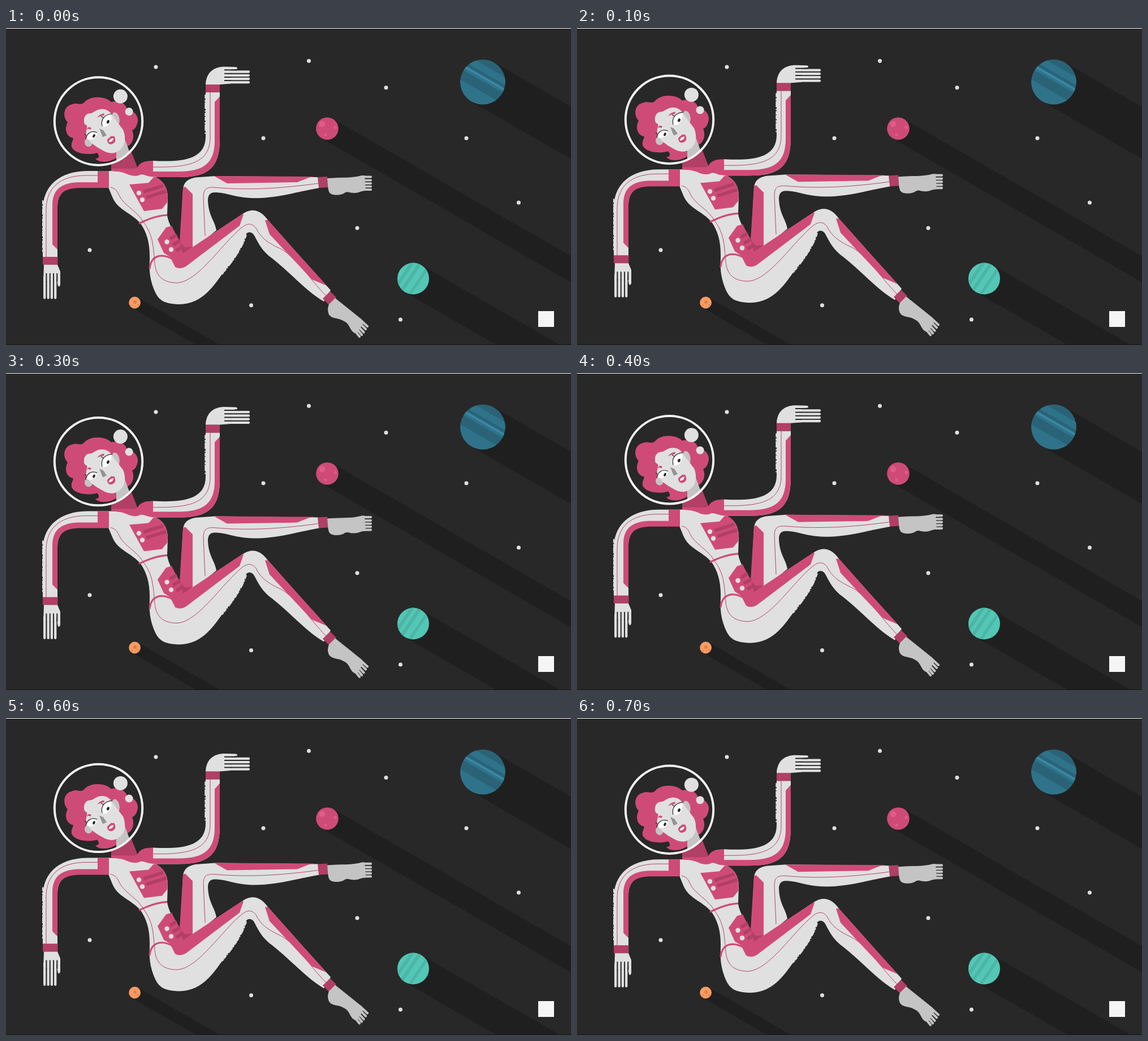
Recreate the animation shown at these times as an HTML page. Size 999x561 px, loop 800 ms.

```html
<!DOCTYPE html>
<html lang="en">
<head>
<meta charset="utf-8">
<title>Adrift</title>
<style>
  html, body { margin: 0; width: 100%; height: 100%; overflow: hidden; background: #282828; }
  svg { display: block; width: 999px; height: 561px; }
  .light { fill: #e0e0e0; }
  .skin { fill: #c4c4c4; }
  .pink { fill: #cf4b77; }
  .deep { fill: #b13f66; }
  .shade { fill: #1f1f1f; }
  .seam { fill: none; stroke: #b2436a; stroke-width: 1; }
  .trim { fill: none; stroke: #cf4b77; stroke-width: 3.2; }
  .bar { fill: none; stroke: #b13f66; stroke-width: 6; }
  .digits { fill: none; stroke: #e0e0e0; stroke-width: 4.3; stroke-linecap: round; }
  .gaps { fill: none; stroke: #282828; stroke-width: 2; }
  .toes { fill: none; stroke: #c4c4c4; stroke-width: 4.2; stroke-linecap: round; }
  .rough { fill: none; stroke: #e0e0e0; stroke-width: 2; stroke-dasharray: 7 2 4 1 11 3 2 2 6 1; }
</style>
</head>
<body>
<svg viewBox="0 0 999 561">
  <defs>
    <clipPath id="blue"><circle r="39.8"/></clipPath>
    <clipPath id="teal"><circle r="28"/></clipPath>
    <clipPath id="glass"><circle cx="163.5" cy="165" r="77"/></clipPath>
  </defs>
  <rect width="999" height="561" fill="#282828"/>
  <g id="shadows" class="shade"></g>
  <g id="stars" class="light"></g>

  <g transform="translate(843 95.5)">
    <g clip-path="url(#blue)"><g transform="rotate(30)">
      <rect x="-40" y="-40" width="80" height="80" fill="#2a6377"/>
      <path fill="#2f738a" d="M-40-27H40V-15H-40ZM-40-10H40V-1H-40ZM-40 16H40V40H-40Z"/>
      <path fill="#3988a5" d="M-40-9H40V-5.500H-40Z"/>
    </g></g>
  </g>
  <g transform="translate(568 178)">
    <circle r="19.8" class="pink"/>
    <g fill="#e15b88"><circle cx="-9" cy="-8" r="5.5"/><circle cx="14" cy="-2" r="2.7"/><circle cx="-3" cy="11" r="2.5"/></g>
  </g>
  <g transform="translate(720 443.5)">
    <g clip-path="url(#teal)"><g transform="rotate(-56)">
      <rect x="-30" y="-30" width="60" height="60" fill="#54c6b5"/>
      <path fill="#4cb5a6" d="M-30-20H30V-14H-30ZM-30-8H30V-2H-30ZM-30 8H30V13H-30Z"/>
    </g></g>
  </g>
  <g transform="translate(227.6 486)">
    <circle r="10.4" fill="#fa9c62"/>
    <g fill="#df7f4c"><circle cx=".5" cy="-1" r="3"/><circle cx="6" cy="4" r="1.5"/><circle cx="-5" cy="5" r="1.2"/><circle cx="1" cy="6" r="1"/></g>
  </g>
  <rect x="941" y="501" width="28" height="28" fill="#f5f5f5"/>

  <g id="diver">
    <!-- far leg -->
    <path class="light" d="M307 393L313 286C314 271 324 265 342 264L370 262L552 264L554 283C500 293 480 301 437 301C403 300 391 291 369 291C360 291 357 297 357 305C358 333 369 340 372 358L330 392Z"/>
    <path class="pink" d="M306 393L313 282L317 281L330 294V388L318 398Z"/>
    <path class="pink" d="M368 262L545 263L535 265L515 273L391 275Z"/>
    <path class="seam" d="M352 368L349 300C349 285 354 282 367 282C410 286 465 287 552 275"/>
    <path class="deep" d="M551 264L568 263L569 282L553 283Z"/>
    <path class="skin" d="M568 266C592 264 613 266 629 261H634L636 288C627 288 625 292 615 292C607 292 605 289 600 291C593 296 586 296 579 295C570 294 570 286 569 280Z"/>
    <path class="toes" d="M630 263.5L645 263.5M631 269.5H645M631 275H645M631 280.5H645M631 286H645"/>

    <!-- torso and near leg -->
    <path class="light" d="M181 253H210L262 263C276 268 286 281 286 300L285 331C287 349 302 369 313 389L328 389L417 330C436 316 452 324 463 340L519 403L574 464L562 484C531 466 503 433 471 408C453 395 447 382 440 369C436 360 428 360 425 364C418 389 404 409 387 429C370 451 350 489 306 489C277 488 269 481 261 461C255 445 253 432 254 411C255 381 249 362 238 346C222 327 197 322 188 299L181 282Z"/>
    <path class="rough" d="M425 366C417 391 403 410 382 436"/>
    <path class="pink" d="M218 277L252 274L262 263C276 268 286 281 286 300L285 309L276 320L244 324Z"/>
    <path class="bar" d="M243 290L278 279M248 300L283 289"/>
    <path class="trim" d="M235 346L246 341Q267 332 285 331"/>
    <path class="pink" d="M268 374L283 353L293 350C300 366 310 381 315 389H328L418 329L420 330L413 350L318 422Q308 428 299 423L290 405L279 398Z"/>
    <path class="deep" d="M308 380L316 388L330 387L313 399Z"/>
    <path class="bar" d="M290 373L302 366M295 384L308 376M301 394L314 386"/>
    <g class="light"><circle cx="235" cy="292" r="4.2"/><circle cx="241" cy="304" r="4.2"/><circle cx="284.5" cy="378.5" r="4.2"/><circle cx="292" cy="392" r="4.2"/></g>
    <path class="trim" d="M254 426C256 402 275 398 295 409"/>
    <path class="seam" d="M185 282C193 284 196 287 200 296C208 314 231 323 242 342C260 366 260 383 263 416C265 438 276 451 303 451C340 449 384 379 417 353C427 345 435 345 442 354C450 371 464 381 484 390C511 403 535 442 566 474"/>
    <path class="pink" d="M458 340H463L519 403L567 456L541 445L466 365Z"/>
    <path class="deep" d="M573 466L584 477L571 490L560 479Z"/>
    <path class="skin" d="M571 489L582 478L612 502L628 515L632 522L620 541C607 538 610 525 598 519C587 512 577 516 571 507C568 500 569 495 571 489Z"/>
    <path class="toes" d="M626 516L639 528M624 521L636 533M622 527L632.5 538.5M620 532L629 543M617 536L625 546"/>

    <!-- lowered arm -->
    <path class="light" d="M182 253H145C100 253 65 275 65 322V406H91V318C91 292 103 282 133 282H182Z"/>
    <path class="rough" d="M65 305V396"/>
    <path class="pink" d="M182 283H133C103 283 91 292 91 318V392L82 383V312C83 283 101 273 132 273H162V253H182Z"/>
    <path class="seam" d="M162 261H142C95 261 71 283 71 322V406"/>
    <rect class="deep" x="65" y="405" width="26.5" height="14"/>
    <path class="light" d="M67 419H91L96 431V454Q94 461 91.500 455L89 438V448H66Z"/>
    <path class="digits" d="M68.2 440V477.500M74.600 440V477.500M80.900 440V477.500M87.200 440V477.500"/>
    <path class="gaps" d="M71.400 434V449M77.750 434V449M84.050 434V449M90.300 434V449"/>

    <!-- collar and raised arm -->
    <path class="deep" d="M186 253V225L216 205L233 248L237 257Z"/>
    <path class="pink" d="M186 249H227L234 246L246 236H262V264L244 256Q232 265 218 260Q204 253 186 253Z"/>
    <path class="light" d="M260 235C305 237 353 236 353 192V114H378V196C378 246 360 264 305 264H260Z"/>
    <path class="rough" d="M352.3 118V187"/>
    <path class="pink" d="M260 235C242 235 235 240 232 248Q239 264 268 264H305C360 264 378 246 378 196V121L369 131V199C369 239 350 254 305 254H260Z"/>
    <path class="seam" d="M260 246C320 247 361 241 361 193V114"/>
    <rect class="deep" x="353" y="100" width="25" height="14"/>
    <path class="light" d="M353 100C354 78 368 68 388 68.5L407 69Q412 72 406 73L388 75H397V98.500L378 100Z"/>
    <path class="digits" d="M390 77.500H429M390 83.800H429M390 90H429M390 96.200H429"/>
    <path class="gaps" d="M386 74.300H408M386 80.650H398M386 86.900H398M386 93.100H398"/>

    <!-- helmet -->
    <circle cx="163.5" cy="165" r="77" fill="#282828"/>
    <g clip-path="url(#glass)">
      <path class="pink" d="M117 135C126 131 131 138 138 132C147 120 174 119 186 131C196 128 213 132 214 145C226 145 234 155 233 165C231 175 228 179 223 181C229 194 222 210 211 210C206 222 198 230 187 234C177 238 163 238 158 231C165 231 166 226 161 221C149 225 121 224 116 210C115 202 118 201 119 195C106 192 103 178 109 167C99 156 102 138 117 135Z"/>
      <path class="skin" d="M195 218L209 194L221 226L201 247L195 237Z"/>
      <ellipse class="skin" cx="194" cy="161" rx="6.5" ry="12" transform="rotate(-12 194 161)"/>
      <ellipse class="skin" cx="146" cy="202" rx="7" ry="8"/>
      <path class="light" d="M138 166C137 157 142 151 149 151C156 150 158 145 166 144C177 142 185 148 191 159L207 180C213 194 210 209 202 215C191 225 180 222 170 216C157 209 147 202 142 190C140 182 146 173 142 172Q138 170 138 166Z"/>
      <path fill="#fff" d="M142 196C144 184 153 181 160 185C163 191 153 201 142 196ZM170 174C167 162 175 152 186 153C188 166 180 178 170 174Z"/>
      <path fill="none" stroke="#282828" stroke-width="1.2" d="M141 197C143 185 152 181 161 185M170 174C167 162 174 153 187 152M142 190L139 188M172 159L168 156"/>
      <g fill="#282828"><ellipse cx="155.5" cy="191" rx="2" ry="3.2" transform="rotate(25 155.5 191)"/><ellipse cx="180.5" cy="166" rx="2.3" ry="3.2" transform="rotate(25 180.5 166)"/></g>
      <path class="pink" d="M143 180Q145 173 151 177L149 180Q146 177 143 180ZM161 159Q165 152 174 151L173 155Q167 155 161 159Z"/>
      <path fill="#939393" d="M165 178L172 181L178 190L171 193Z"/>
      <path class="pink" d="M179 200C179 195 183 195 186 191Q189 192 191 191Q194 196 193 201C189 207 181 208 179 200Z"/>
      <path fill="#fff" d="M182 200Q185 195 190 195Q190 201 182 202Z"/>
    </g>
    <circle cx="163.5" cy="165" r="77.7" fill="none" stroke="#f3f3f3" stroke-width="4"/>
    <g class="light"><circle cx="202.4" cy="121" r="12.5"/><circle cx="217.6" cy="148" r="7"/></g>
  </g>
  <rect width="999" height="1" fill="#fff"/>
  <rect y="560" width="999" height="1" fill="#161616"/>
</svg>
<script>
  const NS = "http://www.w3.org/2000/svg";
  const byId = id => document.getElementById(id);

  function add(parent, tag, attrs) {
    const node = document.createElementNS(NS, tag);
    for (const key in attrs) node.setAttribute(key, attrs[key]);
    parent.append(node);
  }

  for (const [x, y, r] of [[843, 95.5, 40], [568, 178, 20], [720, 443.5, 28], [227.6, 486, 10.5]])
    add(byId("shadows"), "rect", {
      y: -r, width: 1000, height: 2 * r, transform: `translate(${x} ${y}) rotate(30)`
    });

  for (const [cx, cy] of [[265, 69], [535.5, 58.3], [672, 105.5], [455, 195], [814, 195],
    [906.5, 309], [621, 354], [148, 393], [433.5, 490.7], [697.5, 516]])
    add(byId("stars"), "circle", { cx, cy, r: 3.5 });

  const STEP = 100, STEPS = 8, RISE = 2.8;

  function draw(now) {
    const k = Math.floor(now / STEP) % STEPS;
    byId("diver").setAttribute("transform", `translate(0 ${-RISE * Math.min(k, STEPS - k)})`);
    requestAnimationFrame(draw);
  }
  draw(0);
</script>
</body>
</html>
```
